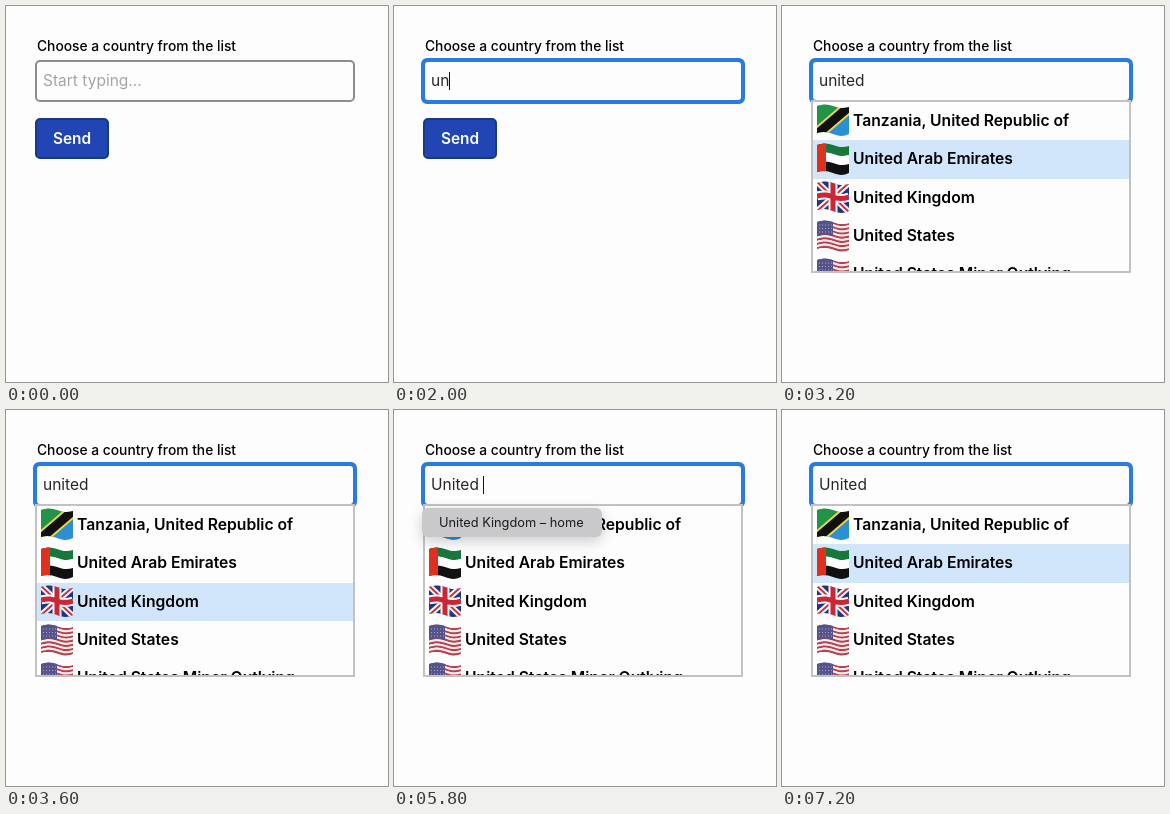
These frames come from a looping animation (382x376 px, 8 s). An HTML page:

```html
<!DOCTYPE html>
<html lang="en">
<head>
<meta charset="utf-8">
<title>Country picker</title>
<style>
  html, body { margin: 0; width: 100%; height: 100%; overflow: hidden; background: #fdfdfd; }
  body { position: relative; font-family: Inter, sans-serif; color: #000; }
  body > * { position: absolute; box-sizing: border-box; white-space: nowrap; }
  #label { left: 31px; top: 30px; font-size: 13.8px; font-weight: 500; line-height: 20px; }
  #field { left: 29px; top: 54px; width: 320px; height: 42px; border: 2px solid #8d8d8d; border-radius: 5px; background: #fdfdfd; }
  #ring { left: 27px; top: 52px; width: 324px; height: 46px; border: 4px solid #2a7be0; border-radius: 6px; }
  #value { left: 37px; top: 65px; height: 20px; font-size: 15.5px; line-height: 20px; white-space: pre; color: #262626; }
  #value.empty { color: #a5a5a5; }
  #caret { width: 1px; height: 18px; top: 66px; background: #111; }
  #send { left: 29px; top: 112px; width: 74px; height: 41px; border: 2px solid #173a85; border-radius: 5px; background: #2146b4;
    color: #fff; font-size: 15.4px; font-weight: 600; line-height: 38px; text-align: center; }
  #list { left: 29px; top: 94px; width: 320px; height: 173px; overflow: hidden; border: 2px solid #c2c2c2; background: #fdfdfd; }
  .row { display: flex; align-items: center; box-sizing: border-box; height: 38.4px; padding: 0 0 1.6px 4px; font-size: 15.7px; font-weight: 600; }
  .row svg { width: 32px; height: 32px; margin-right: 4px; flex: none; }
  .row.on { background: #d1e6fb; }
  #hint { left: 28px; top: 98px; width: 180px; height: 29px; padding-left: 17px; border-radius: 6px; font-size: 12.8px; line-height: 29px;
    background: #c9c9cb; box-shadow: 0 4px 14px rgba(0, 0, 0, .2); color: #1c1c1c; }
</style>
</head>
<body>
<div id="label">Choose a country from the list</div>
<div id="field"></div>
<div id="ring"></div>
<div id="value"></div>
<div id="caret"></div>
<div id="send">Send</div>
<div id="list"></div>
<div id="hint">United Kingdom – home</div>
<svg width="0" height="0">
  <clipPath id="wave"><path d="M0 2C6 0 11 0 16 2S26 5 32 3V30C26 33 21 32 16 30S6 27 0 29Z"/></clipPath>
</svg>
<script>
const $ = id => document.getElementById(id);
const wavy = (y, h) => `M0 ${y}C6 ${y - 2} 11 ${y - 2} 16 ${y}S26 ${y + 3} 32 ${y + 1}v${h}C26 ${y + h + 3} 21 ${y + h + 2} 16 ${y + h}S6 ${y + h - 2} 0 ${y + h}Z`;
const band = (y, h, fill) => `<path d="${wavy(y, h)}" fill="${fill}"/>`;
const line = (d, color, width) => `<path d="${d}" stroke="${color}" stroke-width="${width}" fill="none"/>`;

const cross = 'M16 0V32M0 15C8 13 11 14 16 16S26 18 32 16';
const diagonals = 'M0 1L32 31M32 2L0 30';
const stripes = Array.from({ length: 13 }, (_, i) => band(2 + i * 2.1, 2.2, i % 2 ? '#f3ebec' : '#b5434f')).join('');
const usa = stripes + '<path d="M0 0H16V16C11 14 6 14 0 16Z" fill="#55528c"/>' +
  line('M2 5H15M2 8.5H15M2 12H15', '#a9a7c4', '1" stroke-dasharray="1 2');
const flags = {
  tz: '<path d="M0 0H32L0 32Z" fill="#239447"/><path d="M32 0V32H0Z" fill="#2a8fd4"/>' +
    line('M-2 32L34 1', '#f0d640', 13) + line('M-2 32L34 1', '#101010', 9),
  ae: band(0, 11, '#18773a') + band(11, 10, '#fcfcfc') + band(20, 13, '#111') + '<path d="M0 0H9V32H0Z" fill="#e0301f"/>',
  gb: '<path d="M0 0H32V32H0Z" fill="#22347f"/>' + line(diagonals, '#f6f4f4', 6) + line(diagonals, '#c8303e', 2) +
    line(cross, '#f6f4f4', 9) + line(cross, '#cb2636', 5),
  us: usa
};
const rows = [
  ['tz', 'Tanzania, United Republic of'], ['ae', 'United Arab Emirates'], ['gb', 'United Kingdom'],
  ['us', 'United States'], ['us', 'United States Minor Outlying']
].map(([flag, name]) => {
  const row = document.createElement('div');
  row.className = 'row';
  row.innerHTML = `<svg viewBox="0 0 32 32"><g clip-path="url(#wave)">${flags[flag]}</g></svg><span>${name}</span>`;
  $('list').append(row);
  return row;
});

// each step changes only the properties it names
const steps = [
  [0, { text: '', ring: 0, caret: 0, list: 0, on: -1, hint: 0 }],
  [200, { ring: .5, caret: 1 }],
  [400, { ring: 1 }],
  [800, { caret: 0 }],
  [1200, { caret: 1 }],
  [1800, { text: 'u' }],
  [2000, { text: 'un' }],
  [2200, { text: 'uni', list: 1 }],
  [2400, { text: 'unit' }],
  [2800, { text: 'unite', hint: 1 }],
  [3000, { text: 'united', hint: .4, caret: 0 }],
  [3200, { hint: 0, on: 1 }],
  [3400, { on: 2 }],
  [4000, { text: 'United Kingdom', list: 0, on: -1, caret: 1 }],
  [4400, { caret: 0 }],
  [5000, { caret: 1 }],
  [5200, { text: 'United Kingdo', list: 1 }],
  [5400, { text: 'United King', hint: 1 }],
  [5600, { text: 'United K' }],
  [5800, { text: 'United ' }],
  [6000, { text: 'United' }],
  [6200, { caret: 0 }],
  [6800, { hint: .4 }],
  [7000, { hint: 0 }],
  [7200, { on: 1 }]
];
const loop = 8000;

function render(t) {
  const s = Object.assign({}, ...steps.filter(([at]) => at <= t).map(([, change]) => change));
  $('value').textContent = s.text || 'Start typing...';
  $('value').className = s.text ? '' : 'empty';
  $('ring').style.opacity = s.ring;
  $('caret').style.opacity = s.caret;
  $('caret').style.left = 37 + (s.text ? $('value').offsetWidth : 0) + 'px';
  $('list').style.display = s.list ? 'block' : 'none';
  $('hint').style.opacity = s.hint;
  rows.forEach((row, i) => row.classList.toggle('on', i === s.on));
}

function tick(now) {
  render(now % loop);
  requestAnimationFrame(tick);
}
render(0);
requestAnimationFrame(tick);
</script>
</body>
</html>
```
